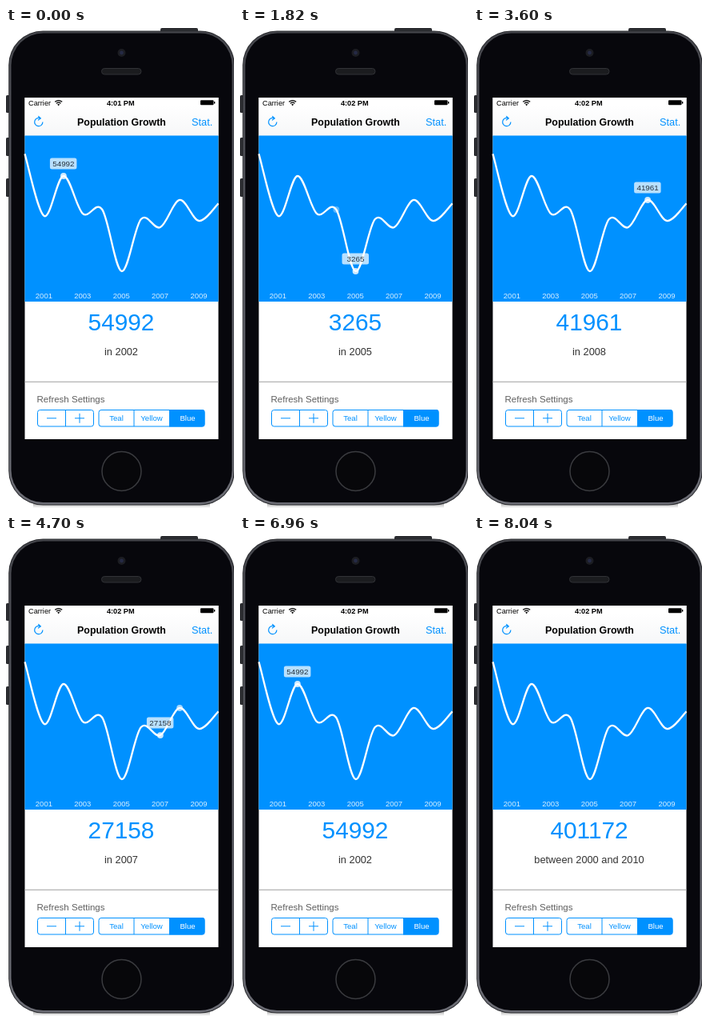
Recreate the animation shown at these times as an HTML page. Size 285 px wide and 600 px high, loop 8060 ms.

```html
<!DOCTYPE html>
<html lang="en">
<head>
<meta charset="utf-8">
<title>Population Growth</title>
<style>
  html, body { margin: 0; height: 100%; overflow: hidden; background: #fff; }
  svg { display: block; width: 100vw; height: 100vh; }
  text { font-family: "Liberation Sans", Arial, sans-serif; }
  .mid { text-anchor: middle; }
  .tint { fill: #0091ff; }
  .line { fill: none; stroke: #0091ff; }
</style>
</head>
<body>
<svg viewBox="0 0 285 600">
  <defs>
    <linearGradient id="rim" x2="0" y2="1">
      <stop offset="0" stop-color="#45464c"/>
      <stop offset=".5" stop-color="#5c5d65"/>
      <stop offset="1" stop-color="#6c6d75"/>
    </linearGradient>
    <linearGradient id="bar" x2="0" y2="1">
      <stop offset=".2" stop-color="#fff"/>
      <stop offset="1" stop-color="#f6f7f8"/>
    </linearGradient>
    <linearGradient id="shadow" x2="0" y2="1">
      <stop offset="0" stop-color="#aaa"/>
      <stop offset="1" stop-color="#fff"/>
    </linearGradient>
  </defs>

  <!-- phone -->
  <rect x="34" y="594" width="221" height="6" fill="url(#shadow)"/>
  <g fill="#2b2c30">
    <rect x="193" y="0" width="47" height="6" rx="2"/>
    <rect x="0" y="84" width="6" height="22" rx="1.5"/>
    <rect x="0" y="137" width="6" height="23" rx="1.5"/>
    <rect x="0" y="188" width="6" height="23" rx="1.5"/>
  </g>
  <rect x="3.2" y="3.5" width="282.6" height="593" rx="43" fill="#2b2c30"/>
  <rect x="4.2" y="4.5" width="280.6" height="591" rx="42" fill="url(#rim)"/>
  <rect x="6.5" y="6.5" width="276" height="586.5" rx="40" fill="#07070c"/>
  <circle cx="144.5" cy="31" r="5" fill="#1c1d22"/>
  <circle cx="144.5" cy="31" r="2.4" fill="#252a45"/>
  <rect x="119.5" y="50.5" width="49.500" height="7.500" rx="3.700" fill="#1b1c1f" stroke="#313236"/>
  <circle cx="144.5" cy="554" r="24.5" fill="#07070a" stroke="#3a3b3f" stroke-width="1.5"/>

  <!-- screen -->
  <rect x="23.5" y="87" width="242" height="427" fill="#fff"/>
  <rect x="23.5" y="87" width="242" height="48" fill="url(#bar)"/>
  <text x="28" y="97" font-size="9.2">Carrier</text>
  <path d="M61.2 92.3q4.5-3.4 9 0M62.9 94.2q2.8-2.2 5.6 0" fill="none" stroke="#000" stroke-width="1.3"/>
  <path d="M65.7 97.2l-1.6-1.8q1.6-1 3.2 0z"/>
  <text id="clock" class="mid" x="143.3" y="97" font-size="9.2" font-weight="bold"></text>
  <rect x="243" y="90.3" width="16.5" height="6" rx="1"/>
  <rect x="260" y="92" width="1.3" height="2.6"/>
  <path class="line" d="M45.900 117.500a5.100 5.100 0 1 1-3.300-4.700M40.300 110.300l3 2.700l-3.300 2.300" stroke-width="1.2"/>
  <text class="mid" x="144.5" y="122" font-size="12.4" font-weight="bold">Population Growth</text>
  <text class="tint" x="232" y="122" font-size="12.8">Stat.</text>

  <!-- graph -->
  <rect class="tint" x="23.5" y="134.5" width="242" height="207.5"/>
  <path id="curve" fill="none" stroke="#fff" stroke-width="2.3"/>
  <g id="years" class="mid" fill="#fff" fill-opacity=".85" font-size="9.5"></g>
  <g id="dots" fill="#fff"></g>
  <g id="popup">
    <rect x="-17" y="-22.500" width="33.5" height="14" rx="2.5" fill="#fff" fill-opacity=".72"/>
    <text id="popupText" class="mid" y="-12" font-size="9.8" fill="#26323c"></text>
  </g>

  <!-- labels and controls -->
  <g id="labels" class="mid">
    <text id="amount" class="tint" x="144" y="378" font-size="29.8"></text>
    <text id="period" x="144" y="409" font-size="12.8" fill="#333"></text>
  </g>
  <path d="M23.5 442.3h242" stroke="#a0a0a0"/>
  <text x="38.5" y="467.5" font-size="11.5" fill="#606060">Refresh Settings</text>
  <rect class="line" x="39.5" y="477.5" width="70" height="20.5" rx="3"/>
  <path class="line" d="M74.5 477.5v20.5M51 487.8h12M86 487.8h12M92 481.8v12"/>
  <rect class="line" x="116" y="477.5" width="132" height="20.5" rx="3"/>
  <path class="line" d="M160 477.5v20.5"/>
  <path class="tint" d="M204 477h41.5q3 0 3 3v15.5q0 3-3 3h-41.5z"/>
  <g class="mid" font-size="9.6">
    <text class="tint" x="138" y="491">Teal</text>
    <text class="tint" x="182" y="491">Yellow</text>
    <text x="227" y="491" fill="#fff">Blue</text>
  </g>
</svg>

<script>
const $ = id => document.getElementById(id);
const LOOP = 8060, FADE = 220, RELEASE = 7640, DOT_ALPHA = .8;
const values = [67000, 33284, 54992, 34537, 36737, 3265, 31526, 27158, 41961, 30646, 40066];
const total = values.reduce((a, b) => a + b);
const points = values.map((v, i) => [23.5 + i * 24.2, 311.5 - v * .0023]);

// [start time, selected point]
const touches = [[0, 2], [480, 3], [1120, 4], [1700, 5], [2320, 6], [2870, 7], [3320, 8],
  [4640, 7], [5220, 6], [5640, 5], [5980, 4], [6220, 3], [6720, 2]];

const clamp = v => Math.max(0, Math.min(1, v));
const ease = v => { v = clamp(v); return v * v * (3 - 2 * v); };

function smoothPath(pts) {
  const at = i => pts[Math.max(0, Math.min(pts.length - 1, i))];
  let d = "M" + pts[0];
  for (let i = 0; i < pts.length - 1; i++) {
    const [a, b, c, e] = [at(i - 1), at(i), at(i + 1), at(i + 2)];
    const c1 = b.map((v, k) => v + (c[k] - a[k]) / 6);
    const c2 = c.map((v, k) => v - (e[k] - b[k]) / 6);
    d += `C${c1} ${c2} ${c}`;
  }
  return d;
}

$("curve").setAttribute("d", smoothPath(points));
$("years").innerHTML = [1, 3, 5, 7, 9]
  .map(i => `<text x="${points[i][0] - .3}" y="338.3">${2000 + i}</text>`).join("");
$("dots").innerHTML = points.map(([x, y]) => `<circle cx="${x}" cy="${y}" r="3.9"/>`).join("");
const dots = [...$("dots").children];

function draw(t) {
  const step = touches.findLastIndex(([start]) => t >= start);
  const [start, selected] = touches[step];
  const previous = step ? touches[step - 1][1] : -1;
  const held = 1 - ease((t - RELEASE) / 200);
  const showTotal = t >= RELEASE + 200;

  dots.forEach((dot, i) => {
    const alpha = i === selected ? held
      : i === previous ? 1 - ease((t - start) / FADE) : 0;
    dot.setAttribute("opacity", DOT_ALPHA * alpha);
  });
  $("popup").setAttribute("transform", `translate(${points[selected]})`);
  $("popup").setAttribute("opacity", held);
  $("popupText").textContent = values[selected];

  $("labels").setAttribute("opacity", showTotal ? ease((t - RELEASE - 200) / 200) : held);
  $("amount").textContent = showTotal ? total : values[selected];
  $("period").textContent = showTotal ? "between 2000 and 2010" : "in " + (2000 + selected);
  $("clock").textContent = t < 440 ? "4:01 PM" : "4:02 PM";
}

const begin = performance.now();
function tick() {
  draw((performance.now() - begin) % LOOP);
  requestAnimationFrame(tick);
}
tick();
</script>
</body>
</html>
```
